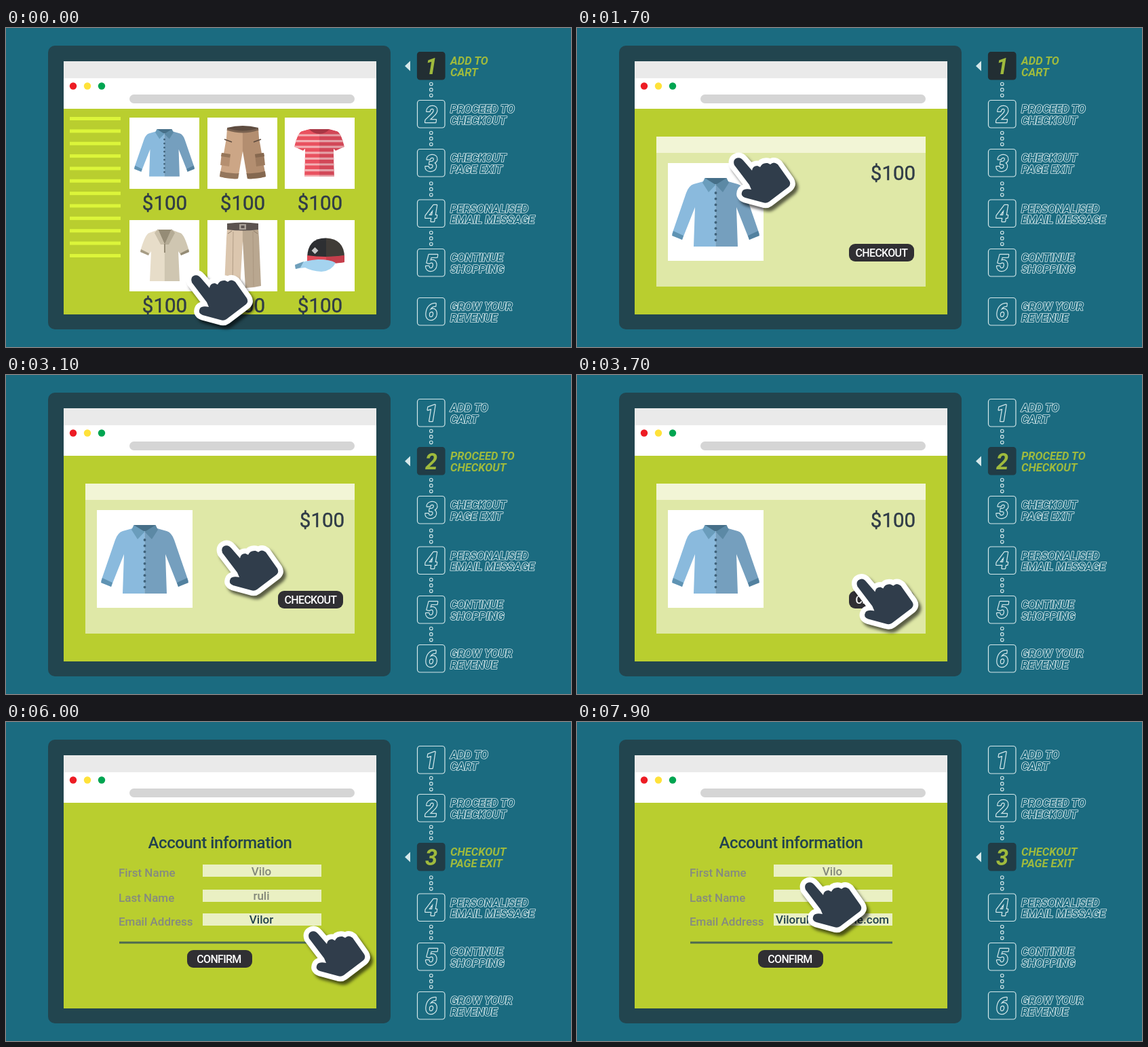
These frames come from a looping animation (833 by 470 pixels, 8000 ms). An HTML page:

```html
<!DOCTYPE html>
<html lang="en">
<head>
<meta charset="utf-8">
<title>Checkout steps</title>
<style>
  html, body { margin: 0; width: 100%; height: 100%; overflow: hidden; background: #1b6b80; }
  svg { display: block; }
  text { font-family: Roboto, "Open Sans", sans-serif; font-size: 17px; font-weight: 500; }
  .mid { text-anchor: middle; }
  .price { font-size: 29.5px; font-weight: 400; fill: #2f3b47; stroke: #2f3b47; stroke-width: .4; text-anchor: middle; }
  .button { font-size: 16px; letter-spacing: -.7px; fill: #fff; text-anchor: middle; }
  .label { fill: #858a80; }
  .step rect { fill: none; stroke: #d5e8ea; stroke-width: 1.2; }
  .step text { font-size: 16.5px; font-weight: 700; font-style: italic;
    fill: #1b6b80; stroke: #d5e8ea; stroke-width: 1.7; paint-order: stroke; stroke-linejoin: round; }
  .step .digit { font-size: 32.5px; stroke-width: 2.4; text-anchor: middle; }
  .step.on rect { fill: #213c46; stroke: #213c46; }
  .step.on:first-child rect { fill: #222e33; stroke: #222e33; }
  .step.on text { fill: #9fba3d; stroke: none; }
  .dots { fill: none; stroke: #d5e8ea; stroke-width: 1.1; }
  #hand { fill: #303d4b; stroke: #fff; stroke-width: 15; stroke-linejoin: round; paint-order: stroke;
    filter: drop-shadow(4px 5px 2px rgba(0, 0, 0, .6)); }
</style>
</head>
<body>
<svg id="stage" width="833" height="470" viewBox="0 0 833 470"></svg>
<script>
const rect = (x, y, w, h, fill, r = 0) =>
  `<rect x="${x}" y="${y}" width="${w}" height="${h}" rx="${r}" fill="${fill}"/>`;
const circle = (x, y, r, fill) => `<circle cx="${x}" cy="${y}" r="${r}" fill="${fill}"/>`;
const path = (d, fill) => `<path d="${d}" fill="${fill}"/>`;
const line = (d, color, w = 1) => `<path d="${d}" fill="none" stroke="${color}" stroke-width="${w}"/>`;
const text = (x, y, s, cls, attrs = '') => `<text x="${x}" y="${y}" class="${cls}" ${attrs}>${s}</text>`;
const repeat = (n, draw) => Array.from({ length: n }, (_, i) => draw(i)).join('');
// A left half and its mirror image about x = cx
const pair = (cx, d, left, right) => path(d, left) +
  `<g transform="translate(${2 * cx}) scale(-1 1)">${path(d, right)}</g>`;

const shirt =
  pair(204.5, 'M190 225L172 230Q165 232 161 243L140 304L155 312L174 264L172 322H204.6V226Z', '#8abadd', '#759fbe') +
  pair(204.5, 'M142 299L157 306L155 312L140 306Z', '#5f93b3', '#52819f') +
  rect(188.5, 221, 32, 9, '#466f88') +
  pair(204.5, 'M188.5 221L204.5 231L194 242L185 228Z', '#6a9dbc', '#5c89a5') +
  repeat(9, i => circle(204.5, 243 + i * 8.7, 1.9, '#3f627a'));

const shorts =
  path('M326 147Q349 141 372 147V154H326Z', '#5e4c40') +
  pair(349, 'M326 148Q337 153 349.1 153V181L342 222Q328 223 315 219L325 162Z', '#cca686', '#b38e70') +
  pair(349, 'M316 211Q329 215 343.5 214L342 222Q328 223 315 219Z', '#94765c', '#846850') +
  pair(349, 'M318 184L331 186L329 204L316 202Z', '#b58f70', '#9c7a5e') +
  pair(349, 'M318 184L331 186L330 191L317 189Z', '#967659', '#86684f') +
  line('M322 164L333 168M376 164L365 168', '#5e4c40', 1.5) +
  line('M326 149Q349 157 372 149', '#7a6250', 3);

const teeHalf = 'M447 149L436 152Q430 154 425 175L438 181L441 178L440 219H462.1V153Z';
const teeStripes = repeat(8, i => `M424 ${158 + i * 8.6}H462`);
const tee =
  `<clipPath id="tee"><path d="${teeHalf}"/></clipPath>` +
  [['', '#e9515f', '#f4b0b4'], ['translate(924) scale(-1 1)', '#d24757', '#e3a0a6']].map(([flip, red, pink]) =>
    `<g transform="${flip}"><g clip-path="url(#tee)">${path(teeHalf, red) + line(teeStripes, pink, 3.2)}</g></g>`).join('') +
  path('M447 149H477Q471 156 462 156T447 149Z', '#a83644');

const polo =
  pair(234, 'M222 298L211 302Q205 304 198 329L210 335L214 329L212 373H234.1V300Z', '#e7ddc9', '#cfc6b1') +
  pair(234, 'M199 326L211 332L210 335L198 330Z', '#a69c84', '#948b75') +
  path('M224 297H244L234 319Z', '#958c76') +
  pair(234, 'M224 296L234 319L228 319L219 302Z', '#c9bfa9', '#b4ab95') +
  line('M234 318V331', '#958c76', 2);

const trousers =
  pair(349, 'M326 296H349.1V312L345 383Q334 383 322 380L325 310Z', '#dbc6ae', '#b9a790') +
  path('M326 288Q349 285 372 288V297Q349 300 326 297Z', '#5b5350') +
  rect(344, 289, 10, 8, '#aaa29a') + rect(346.5, 291, 5, 4, '#5b5350') +
  line('M335 300L334 380M364 300L365 380', '#a8947d', .8) +
  line('M327 303L333 299M371 303L365 299', '#8f7c68');

const cap =
  path('M444 338Q445 309 472 309.5V340Z', '#2d2f32') +
  path('M472 309.5Q499 311 499 338L472 342Z', '#403c37') +
  path('M444 335Q472 339 499 335V345Q472 349 444 345Z', '#df4a57') +
  path('M472 337.2Q488 337 499 335V345Q488 347 472 347Z', '#c53e4b') +
  path('M426 349Q442 342 460 341Q478 341 486 346Q480 358 465 359Q450 358 441 353Q432 354 427 355Z', '#a4d3ef') +
  path('M426 349L439 344L434 353L427 355Z', '#709fba') +
  `<g transform="rotate(45 455.5 328)">${rect(452, 324.5, 7, 7, '#c9c9c9')}</g>`;

const catalog =
  repeat(12, i => rect(94, 131 + i * 18.36, 75, 5, '#dcf53a')) +
  repeat(6, i => {
    const x = [182, 297, 411][i % 3], y = i < 3 ? 132 : 283;
    return rect(x, y, 103, 105, '#fff') + text(x + 52, y + 135.5, '$100', 'price');
  }) +
  `<g transform="translate(92.4 -3.5) scale(.69)">${shirt}</g>` + shorts + tee + polo + trousers + cap;

const basket =
  rect(117, 160, 397, 221, '#dfe8a7') + rect(117, 160, 397, 24, '#f2f5d6') +
  rect(134, 199, 141, 144, '#fff') + shirt + text(466, 224, '$100', 'price') +
  rect(401, 318, 96, 26, '#302f33', 9) + text(449, 337, 'CHECKOUT', 'button');

const form =
  text(315.5, 186, 'Account information', 'mid', 'fill="#22424e" style="font-size:24px;letter-spacing:-.45px"') +
  ['First Name', 'Last Name', 'Email Address'].map((s, i) => {
    const y = [210, 247, 282][i];
    return text(166, y + 18, s, 'label') + rect(290, y, 175, 18, '#eaf0c3');
  }).join('') +
  text(376.5, 226, 'Vilo', 'mid', 'fill="#83887a"') +
  text(376.5, 262, 'ruli', 'mid', 'fill="#83887a"') +
  text(376.5, 297, '', 'mid', 'id="email" fill="#22424e"') +
  rect(167, 323.5, 298, 3, '#4d6a50') +
  rect(267, 336, 96, 26, '#302f33', 9) + text(314, 355, 'CONFIRM', 'button');

const page = (id, content) => `<g id="${id}">${rect(85, 119, 461, 303, '#b9ce2f')}${content}</g>`;

const tops = [35.5, 106.5, 178.5, 253, 325.5, 397.5];
const titles = ['ADD TO/CART', 'PROCEED TO/CHECKOUT', 'CHECKOUT/PAGE EXIT',
  'PERSONALISED/EMAIL MESSAGE', 'CONTINUE/SHOPPING', 'GROW YOUR/REVENUE'];
const steps = tops.map((y, i) => {
  const [first, second] = titles[i].split('/');
  return `<g class="step">${rect(606.5, y, 40.5, 40.5, '', 4)}` +
    text(627, y + 32, i + 1, 'digit') + text(655, y + 18.8, first) + text(655, y + 35, second) + '</g>';
}).join('');
const dots = tops.slice(1).map((y, i) =>
  `<g class="dots">${repeat(3, k => circle(626.8, y - 24 + k * 8.4, 2.3, 'none'))}</g>`).join('');

const stage = document.getElementById('stage');
stage.innerHTML =
  rect(0, 0, 833, 470, '#1b6b80') + rect(62, 26, 505, 418, '#22454f', 10) +
  rect(85, 49, 461, 25, '#eaeaea') + rect(85, 74, 461, 45, '#fff') +
  ['#ed1c24', '#ffe23a', '#00a551'].map((c, i) => circle(99 + i * 21, 85.5, 5.2, c)).join('') +
  rect(182, 98, 332, 13, '#d5d5d5', 6.5) +
  `<svg width="833" height="422">${page('catalog', catalog) + page('basket', basket) + page('form', form)}</svg>` +
  `<g>${steps}</g>` + dots +
  '<path id="arrow" d="M588 0L596 -7.5V7.5Z" fill="#d5e8ea"/>' +
  `<path id="hand" d="M9 19Q6 11 13 8.5Q18 7 22 12L35 27Q36 20 43 20L47 22Q50 15 58 16L62 18Q67 13 73 18
    L90 42Q93 47 89 51L60 73Q56 76 51 74L25 67Q17 64 21 57Q24 53 34 55L31 48Z"/>`;

const [basketEl, formEl, emailEl, arrowEl, handEl] =
  ['basket', 'form', 'email', 'arrow', 'hand'].map(id => document.getElementById(id));
const stepEls = [...document.querySelectorAll('.step')];
const lastDots = [...document.querySelectorAll('.dots')].pop();

const email = 'Vilorul@example.com';
// Time, left, top of the pointer
const route = [
  [0, 265, 356], [400, 265, 356], [1000, 241, 266], [1300, 226, 221], [1550, 223, 183],
  [2600, 223, 183], [3100, 310, 243], [3500, 382, 276], [4000, 438, 317],
  [5000, 438, 317], [5100, 438, 300], [7300, 438, 300], [7900, 328, 228], [8000, 328, 228],
];
const clamp = v => Math.max(0, Math.min(1, v));

function pointer(t) {
  const i = route.findIndex(p => p[0] > t);
  const [a, b] = [route[i - 1], route[i]];
  const u = (t - a[0]) / (b[0] - a[0]);
  return [1, 2].map(k => a[k] + (b[k] - a[k]) * u);
}

function draw(now) {
  const t = Math.floor(now % 8000 / 100) * 100; // the motion runs at ten pictures a second
  basketEl.setAttribute('opacity', clamp((t - 1500) / 200));
  formEl.setAttribute('opacity', clamp((t - 3900) / 200));
  emailEl.textContent = email.slice(0, Math.max(0, (t - 5500) / 100));
  const active = t < 2200 ? 0 : t < 4600 ? 1 : 2;
  stepEls.forEach((el, i) => el.classList.toggle('on', i === active));
  arrowEl.setAttribute('transform', `translate(0 ${tops[active] + 20.5})`);
  lastDots.setAttribute('opacity', t < 2200 ? 0 : 1);
  handEl.setAttribute('transform', `translate(${pointer(t)})`);
}

const start = performance.now();
function tick() {
  draw(performance.now() - start);
  requestAnimationFrame(tick);
}
tick();
</script>
</body>
</html>
```
